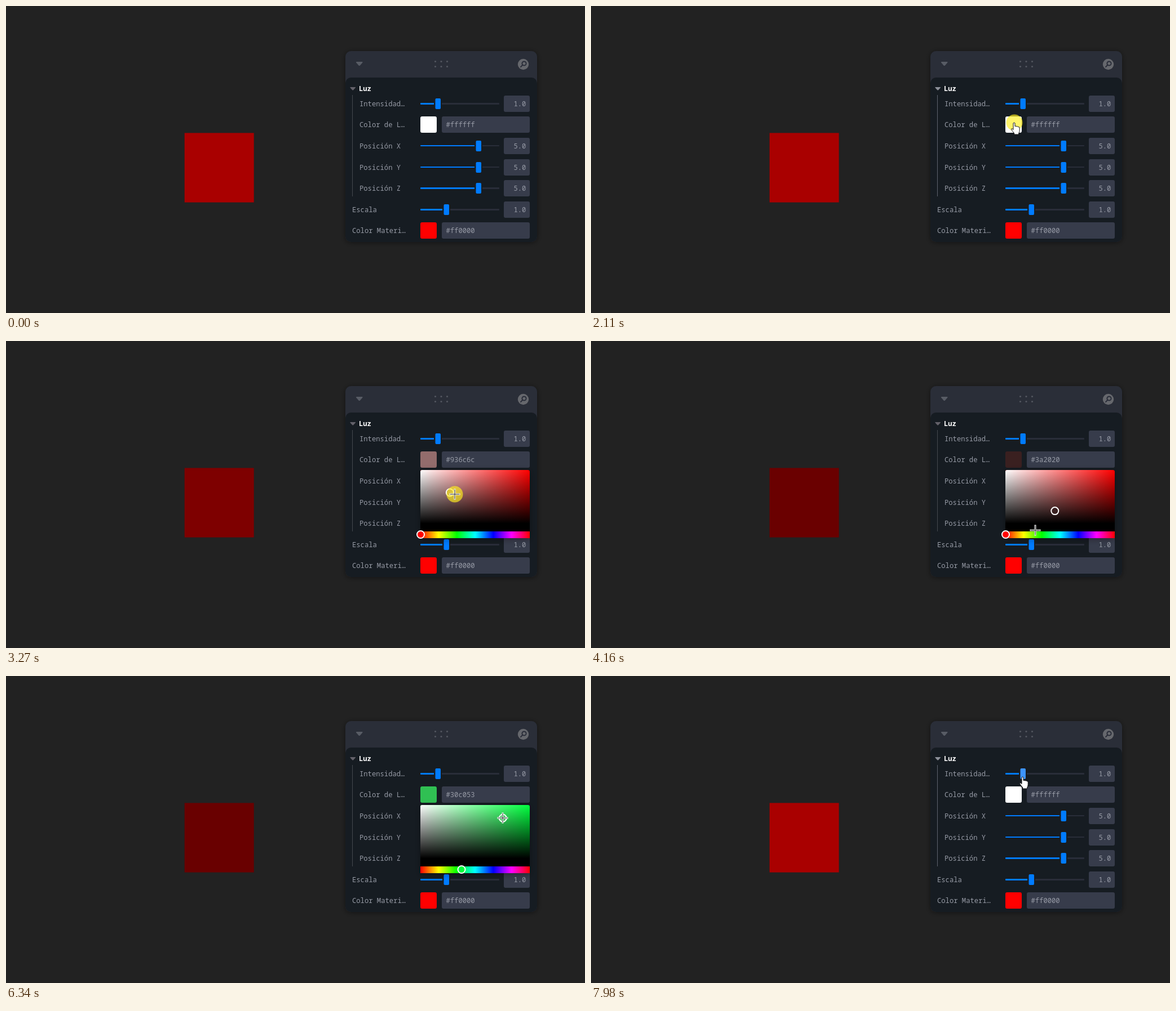
An HTML page that plays this animation: 1027x545 px, repeating every 8000 ms.

```html
<!DOCTYPE html>
<html lang="es">
<head>
<meta charset="utf-8">
<title>Panel de luz</title>
<style>
  html, body { margin: 0; width: 100%; height: 100%; overflow: hidden; background: #222; }
  svg { display: block; width: 100%; height: 100%; }
  text { font: 12.2px "Noto Sans Mono", "DejaVu Sans Mono", monospace; fill: #979ba6; white-space: pre; }
</style>
</head>
<body>
<svg viewBox="0 0 1027 545">
  <defs>
    <filter id="panelShadow" x="-10%" y="-10%" width="120%" height="120%">
      <feDropShadow dx="0" dy="1" stdDeviation="5" flood-color="#000" flood-opacity=".45"/>
    </filter>
    <filter id="pickerShadow" x="-10%" y="-15%" width="120%" height="130%">
      <feDropShadow dx="0" dy="2" stdDeviation="6" flood-color="#000" flood-opacity=".35"/>
    </filter>
    <linearGradient id="whiten"><stop stop-color="#fff"/><stop offset="1" stop-color="#fff" stop-opacity="0"/></linearGradient>
    <linearGradient id="blacken" x2="0" y2="1"><stop stop-opacity="0"/><stop offset=".87"/></linearGradient>
    <linearGradient id="rainbow"></linearGradient>
    <path id="area" d="M738 229H926q3 0 3 3V338H735V232q0-3 3-3z"/>
  </defs>
  <rect width="1027" height="545" fill="#222"/>
  <rect id="cube" x="316.7" y="225.4" width="123" height="123.2"/>

  <g filter="url(#panelShadow)">
    <rect x="602" y="80" width="340" height="339" rx="10" fill="#292d39"/>
    <rect x="602" y="127" width="340" height="292" rx="10" fill="#181c20"/>
  </g>
  <path d="M622 99h9.500q2 0 .8 1.500l-4.300 5q-1.300 1.200-2.500 0l-4.300-5q-1.200-1.500.8-1.500z" fill="#585c65"/>
  <g id="grip" fill="#535760"></g>
  <circle cx="917.500" cy="103.500" r="9.700" fill="#66686d"/>
  <g fill="none" stroke="#292d39" stroke-width="2" stroke-linecap="round">
    <circle cx="919" cy="102" r="3.600"/><path d="M916.300 104.800l-3.300 3.300"/>
  </g>
  <path id="fold" d="M611 144h8.500q1.200 0 .4 1l-3.600 4q-1.100 1-2.200 0l-3.600-4q-.7-1 .5-1z"/>
  <text x="626" y="151" style="fill:#fefefe;font-weight:600">Luz</text>
  <path id="guide" d="M614.500 158V338"/>
  <g id="rows"></g>

  <g id="picker">
    <path d="M738 229H926q3 0 3 3V350H735V232q0-3 3-3z" filter="url(#pickerShadow)"/>
    <use id="hueArea" href="#area"/>
    <use href="#area" fill="url(#whiten)"/>
    <use href="#area" fill="url(#blacken)"/>
    <rect x="735" y="338" width="194" height="12" fill="url(#rainbow)"/>
    <circle id="hueRing" cy="343.500" r="6.500" stroke="#fff" stroke-width="2"/>
    <circle id="toneRing" r="6.500" stroke="#fff" stroke-width="2"/>
  </g>

  <g id="cursor">
    <circle id="press" r="14.500" fill="#ffee1e" fill-opacity=".66"/>
    <path id="hand" fill="#fff" stroke="#111" d="M-2 1q1.500-2 3 0v5.500q2.500-1 3 .5q2-.8 2.800.6q2.200-.4 2.400 2v4q0 3-1.500 5.400v2h-8v-2q-2.500-3-5-6.500q-.6-2 1.200-1.800l2.100 1.800z"/>
    <g id="cross" fill="none">
      <path d="M-9.500 0H9.500M0-9.500V9.500" stroke="#fff" stroke-width="3"/>
      <path d="M-8.500 0H8.500M0-8.500V8.500" stroke="#222"/>
    </g>
    <path id="beam" d="M-3-8h2.500l.5.500.5-.5H3M0-7.500V7.500M-3 8h2.500l.5-.5.500.5H3" fill="none" stroke="#ddd"/>
  </g>
</svg>
<script>
const LOOP = 8000, STEP = 68, LAG = 70;
const LEFT = 735, TOP = 229, WIDTH = 194, HEIGHT = 94;

const $ = id => document.getElementById(id);
const set = (node, attrs) => { for (const k in attrs) node.setAttribute(k, attrs[k]); return node; };
const add = (parent, tag, attrs) =>
  parent.appendChild(set(document.createElementNS("http://www.w3.org/2000/svg", tag), attrs));
const show = (id, on) => { $(id).style.display = on ? "" : "none"; };
const clamp = v => Math.max(0, Math.min(1, v));

// Panel rows: label, and a number with its place on the slider, or a colour.
const rows = [
  ["Intensidad…", "1.0", .22], ["Color de L…", "#ffffff"],
  ["Posición X", "5.0", .735], ["Posición Y", "5.0", .735], ["Posición Z", "5.0", .735],
  ["Escala", "1.0", .328], ["Color Materi…", "#ff0000"]
];
const write = (x, y, content) => {
  const node = add($("rows"), "text", { x, y: Math.round(y + 4.5) });
  node.textContent = content;
  return node;
};
const box = (x, y, width, height, rx, fill) =>
  add($("rows"), "rect", { x, y: Math.round(y - height / 2), width, height, rx, fill });

const parts = rows.map(([label, value, place], i) => {
  const y = 173.3 + 37.57 * i;
  write(i < 5 ? 627 : 614, y, label);
  if (place === undefined) {
    box(773, y, 156, 29, 3, "#373c4b");
    return { swatch: box(LEFT, y, 29, 29, 3, value), hex: write(780.5, y, value) };
  }
  const x = Math.round(LEFT + 140 * place);
  const thick = i === 2 || i === 3 ? 2 : 3;
  box(LEFT, y, 140, thick, 1, "#292d39");
  box(LEFT, y, x - LEFT, thick, 1, "#007bff");
  box(x - 7, y, 14, 23, 3, "#181c20");
  const knob = box(x - 4.5, y, 9.5, 19, 2, "#007bff");
  box(883, y, 46, 29, 3, "#373c4b");
  write(900.5, y, value);
  return { knob };
});
for (let i = 0; i < 6; i++)
  add($("grip"), "circle", { cx: 761.5 + 10.5 * (i % 3), cy: i < 3 ? 98.5 : 107.5, r: 1.6 });
for (let i = 0; i <= 6; i++)
  add($("rainbow"), "stop", { offset: i / 6, "stop-color": `hsl(${i * 60},100%,50%)` });

// Pointer moves: start, end, x, y, and what the held button does.
const origin = [862, 400];
const moves = [
  [200, 340, 893, 182],
  [610, 1230, 768, 207],
  [1560, 1960, 751, 207],
  [2040, 2230, 751, 207, "click"],
  [2500, 2660, 741, 233],
  [2660, 3180, 786.8, 269.2, "tone"],
  [3180, 3250, 796, 272, "tone"],
  [3250, 3640, 822, 301.6, "tone"],
  [3750, 4090, 788, 336],
  [4160, 4480, 797, 344],
  [4480, 5000, 807.5, 344, "hue"],
  [5170, 5570, 822, 301.6],
  [5570, 6200, 880.5, 252.2, "tone"],
  [6670, 7350, 735, 229, "tone"],
  [7500, 7780, 766, 179]
];

function pointer(t) {
  let [x, y] = origin;
  for (const [start, end, toX, toY] of moves) {
    const k = clamp((t - start) / (end - start));
    x += (toX - x) * k;
    y += (toY - y) * k;
  }
  return [x, y];
}

// The picked tone trails the pointer and stays where it was last dragged.
function toneAt(t) {
  const tone = { hue: 0, sat: 0, val: 1 };
  for (const [start, end, , , action] of moves) {
    if (t - LAG < start) break;
    const [x, y] = pointer(Math.min(t - LAG, end));
    if (action === "hue") tone.hue = 360 * clamp((x - LEFT) / WIDTH);
    if (action === "tone") {
      tone.sat = clamp((x - LEFT) / WIDTH);
      tone.val = 1 - clamp((y - TOP) / HEIGHT);
    }
  }
  return tone;
}
function rgb({ hue, sat, val }) {
  return [5, 3, 1].map(n => {
    const k = (n + hue / 60) % 6;
    return Math.round(255 * val * (1 - sat * Math.max(0, Math.min(k, 4 - k, 1))));
  });
}
const hex = c => "#" + c.map(v => v.toString(16).padStart(2, "0")).join("");

// Red light plus ambient light, added in linear space.
function cubeColor(red) {
  const light = ((red / 255 + .055) / 1.055) ** 2.4;
  return `rgb(${Math.round(255 * (1.055 * (.1325 + .265 * light) ** (1 / 2.4) - .055))},0,0)`;
}

function draw(time) {
  const t = Math.floor((time + STEP / 4) / STEP) * STEP - STEP / 4;
  const open = time >= 2240 && time < 7570;
  const hover = time >= 200 && !open;
  const tone = toneAt(t);
  const channels = rgb(tone);
  const color = hex(channels);
  const hueColor = `hsl(${tone.hue},100%,50%)`;

  set($("cube"), { fill: cubeColor(channels[0]) });
  set(parts[1].swatch, { fill: color });
  parts[1].hex.textContent = color;
  set(parts[0].knob, { fill: time >= 7780 ? "#3d94ff" : "#007bff" });
  set($("fold"), { fill: hover ? "#8c9099" : "#63616a" });
  set($("guide"), { stroke: hover ? "#5d626c" : "#44484f" });

  show("picker", open);
  set($("hueArea"), { fill: hueColor });
  set($("hueRing"), { cx: LEFT + .5 + tone.hue / 360 * WIDTH, fill: hueColor });
  set($("toneRing"), { cx: LEFT + .8 + tone.sat * WIDTH, cy: TOP + (1 - tone.val) * HEIGHT, fill: color });

  const [x, y] = pointer(t).map(Math.round);
  const kind = open && y >= TOP ? "cross" : x > 772 ? "beam" : "hand";
  show("cursor", time >= 200);
  set($("cursor"), { transform: `translate(${x} ${y})` });
  for (const id of ["cross", "beam", "hand"]) show(id, id === kind);
  show("press", moves.some(([start, end, , , action]) => action && t >= start && t < end));
}

const begin = performance.now();
function frame() {
  draw((performance.now() - begin) % LOOP);
  requestAnimationFrame(frame);
}
frame();
</script>
</body>
</html>
```
